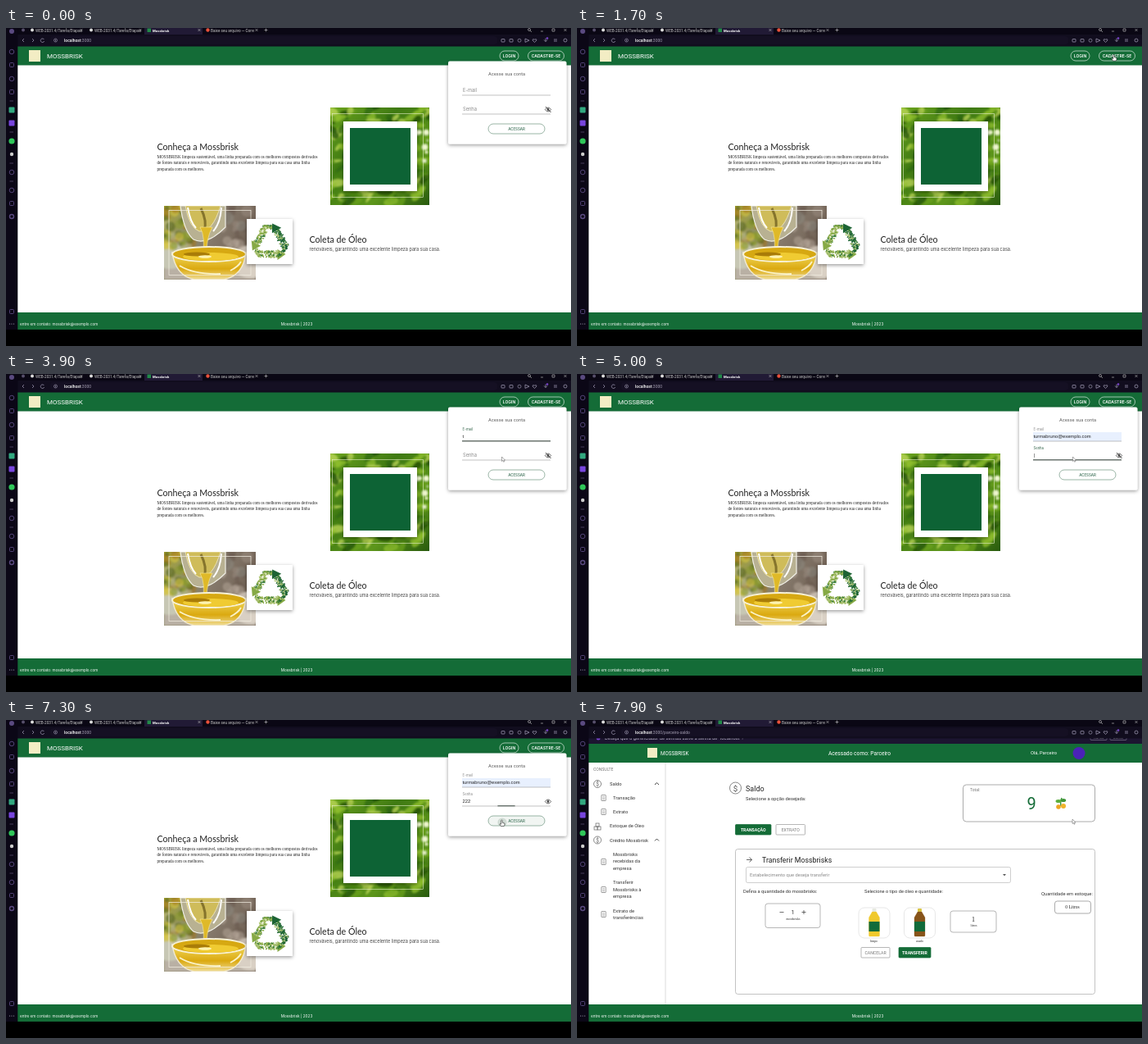
These frames come from a looping animation (690 by 388 pixels, 8 s). An HTML page:

```html
<!DOCTYPE html>
<html lang="pt">
<head>
<meta charset="utf-8">
<style>
html, body { margin: 0; width: 100%; height: 100%; overflow: hidden; background: #000; }
svg { display: block; width: 690px; height: 388px; }
text { white-space: pre; }
</style>
</head>
<body>
<svg id="stage" viewBox="0 0 690 388"></svg>
<script>
const GREEN = '#146c37', LOOP = 8000;
const SANS = 'Roboto,sans-serif', GEO = 'Inter,sans-serif', SERIF = "'Liberation Serif',serif";
const MAIL = 'turmabruno@exemplo.com';

// Shape helpers, each returning SVG markup
const rect = (x, y, w, h, fill, more = '') =>
  `<rect x="${x}" y="${y}" width="${w}" height="${h}" fill="${fill}" ${more}/>`;
const text = (x, y, size, s, fill = '#333', font = SANS, more = '') =>
  `<text x="${x}" y="${y}" font-size="${size}" fill="${fill}" font-family="${font}" ${more}>${s}</text>`;
const mid = (x, y, size, s, fill, font, more = '') =>
  text(x, y, size, s, fill, font, 'text-anchor="middle" ' + more);
const line = (d, color, w = 1, fill = 'none') =>
  `<path d="${d}" stroke="${color}" stroke-width="${w}" fill="${fill}"/>`;
const oval = (x, y, rx, ry, fill, more = '') =>
  `<ellipse cx="${x}" cy="${y}" rx="${rx}" ry="${ry}" fill="${fill}" ${more}/>`;
const dot = (x, y, r, fill, more) => oval(x, y, r, r, fill, more);
const ring = (x, y, r, color, w = .8) => dot(x, y, r, 'none', `stroke="${color}" stroke-width="${w}"`);
const frame = (x, y, w, h, color, r = 0, sw = .7, fill = 'none') =>
  rect(x, y, w, h, fill, `rx="${r}" stroke="${color}" stroke-width="${sw}"`);
const group = (id, s) => `<g id="${id}">${s}</g>`;
const BOLD = 'font-weight="600"';

let seed = 7;
const rnd = (a = 0, b = 1) => {
  seed = (seed * 16807) % 2147483647;
  return a + (b - a) * seed / 2147483647;
};
const pick = list => list[Math.floor(rnd(0, list.length))];

const defs = `<defs>
<linearGradient id="leaf" x2="1" y2="1"><stop stop-color="#6da51f"/><stop offset=".35" stop-color="#3f7a12"/><stop offset=".7" stop-color="#5d961b"/><stop offset="1" stop-color="#285a0d"/></linearGradient>
<linearGradient id="kitchen" x2="1" y2=".4"><stop stop-color="#a9a52f"/><stop offset=".3" stop-color="#8f9068"/><stop offset=".6" stop-color="#85796b"/><stop offset="1" stop-color="#6f5f53"/></linearGradient>
<linearGradient id="oil" x2="0" y2="1"><stop stop-color="#f2dc62"/><stop offset=".6" stop-color="#dba910"/><stop offset="1" stop-color="#f0dd97"/></linearGradient>
<filter id="shade" x="-20%" y="-20%" width="140%" height="150%"><feDropShadow dx="0" dy="1.5" stdDeviation="2" flood-opacity=".4"/></filter>
<filter id="soft"><feGaussianBlur stdDeviation="1"/></filter>
<clipPath id="cut1"><path d="M396 97h121v119h-121z"/></clipPath>
<clipPath id="cut2"><path d="M193 217h112v90h-112z"/></clipPath>
<clipPath id="pill"><rect x="589" y="117" width="69" height="12" rx="6"/></clipPath>
</defs>`;

function leaves() {
  let s = '';
  for (let i = 0; i < 150; i++) {
    const x = rnd(396, 517), y = rnd(97, 216);
    s += oval(x, y, rnd(4, 11), rnd(2, 5),
      pick(['#1f4d08', '#2f690d', '#4a8612', '#69a01c', '#8fbf2c', '#bfd858']),
      `opacity=".75" transform="rotate(${rnd(-80, 30)} ${x} ${y})"`);
  }
  for (let i = 0; i < 7; i++) s += dot(rnd(503, 515), rnd(125, 185), rnd(1, 4), '#eef6cf');
  return `<g clip-path="url(#cut1)">${rect(396, 97, 121, 119, 'url(#leaf)')}<g filter="url(#soft)">${s}</g></g>`
    + frame(398.5, 104.5, 111, 102, '#e5efc8', 0, .6)
    + rect(412, 114, 90, 85, '#fff', 'filter="url(#shade)"') + rect(420, 122, 74, 69, '#0d6335');
}

function oilPhoto() {
  let back = rect(193, 284, 112, 23, '#b9b0a4') + oval(298, 285, 22, 20, '#d9d0c4') + oval(200, 278, 20, 16, '#c7c7b4');
  for (let i = 0; i < 45; i++)
    back += dot(rnd(193, 228), rnd(217, 272), rnd(2, 6), pick(['#8b9a2b', '#d6c53f', '#55661f', '#b9b98c', '#a2741d']), 'opacity=".6"');
  for (let i = 0; i < 20; i++)
    back += dot(rnd(262, 305), rnd(217, 275), rnd(3, 8), pick(['#9c8e82', '#65564b', '#8d8b82', '#b5a799']), 'opacity=".5"');
  const jug = line('M213 217Q217 248 229 258Q245 266 268 243V217Z', '#f0efe6', 1.2, '#b8b192')
    + line('M219 217Q224 244 236 248Q252 250 262 217Z', '#f4ecc0', .8, '#cfbc5a')
    + line('M222 219Q225 237 232 244M263 219Q262 238 253 248', '#fff', 2)
    + line('M238 220Q246 236 242 247', '#85742c', 3);
  const stream = line('M237 243Q244 255 240 279H245Q244 257 252 243Z', '#f9eb9d', .6, '#dfb928');
  const bowl = line('M203 274Q207 302 230 307H266Q290 302 293 274Z', '#f2ead0', 1.5, 'url(#oil)')
    + oval(248, 276, 45, 9, '#d6a812', 'stroke="#f8f2d6" stroke-width="2"')
    + oval(250, 279, 34, 5, '#f0cb32') + oval(233, 276, 16, 2.5, '#a97c08')
    + oval(243, 279, 8, 1.7, '#fff3b0')
    + line('M212 290Q230 301 262 300M274 296Q284 291 287 285', '#fbf3c8', 1.8);
  return `<g clip-path="url(#cut2)">${rect(193, 217, 112, 90, 'url(#kitchen)')}<g filter="url(#soft)">${back}</g>${jug + stream + bowl}</g>`
    + frame(199, 222.5, 100, 79, '#f4f0e4', 0, .7);
}

// Three bent arrows filled with small leaves
function recycling() {
  let s = rect(294, 233, 56, 55, '#fff', 'filter="url(#shade)"');
  ['#86a945', '#86a945', '#1c6334'].forEach((color, k) => {
    let arm = line('M9 8L19 14L9 21Z', 'none', 0, color);
    for (let i = 0; i < 110; i++) {
      const along = rnd(-25, 10), across = rnd(10, 18), bend = Math.max(0, -14 - along);
      const x = along + bend * .5, y = across - bend * .87;
      arm += oval(x, y, 1.5, .8, pick([color, color, '#397c3a', '#b1c678']), `transform="rotate(${rnd(0, 180)} ${x} ${y})"`);
    }
    s += `<g transform="translate(322.5 262) rotate(${k * 120})">${arm}</g>`;
  });
  return s;
}

const button = (x, y, w, h, label, filled) =>
  frame(x, y, w, h, filled ? GREEN : '#999', 1, .7, filled ? GREEN : '#fff')
  + mid(x + w / 2, y + h / 2 + 2, 5.2, label, filled ? '#fff' : '#777', SANS, filled ? BOLD : '');
const pill = (x, w, label) => frame(x, 28, w, 12, '#dcebe1', 6) + mid(x + w / 2, 36, 5, label, '#fff', GEO, BOLD);

const home = rect(14, 22, 676, 326, '#fff')
  + rect(14, 45, 676, 1, '#8fb59d') + rect(14, 22, 676, 23, GREEN)
  + rect(28, 27, 14, 14, '#f3edc4')
  + text(50, 37, 8, 'MOSSBRISK', '#fff')
  + pill(603, 23, 'LOGIN') + pill(637.5, 44, 'CADASTRE-SE')
  + text(184.5, 149, 10.7, 'Conheça a Mossbrisk', '#222', 'Lato,sans-serif')
  + ['MOSSBRISK limpeza sustentável, uma linha preparada com os melhores compostos derivados',
    'de fontes naturais e renováveis, garantindo uma excelente limpeza para sua casa uma linha',
    'preparada com os melhores.'].map((s, i) => text(184.5, 158.7 + i * 7.6, 5.15, s, '#222', SERIF)).join('')
  + text(370.5, 262, 10.7, 'Coleta de Óleo', '#222', 'Lato,sans-serif')
  + text(370.5, 271.5, 5.53, 'renováveis, garantindo uma excelente limpeza para sua casa.', '#444', GEO)
  + leaves() + oilPhoto() + recycling();

const popup = rect(540, 40.5, 144.5, 101, '#fff', 'rx="2" filter="url(#shade)"')
  + mid(611.5, 57.5, 5.4, 'Acesse sua conta', '#555', GEO)
  + '<g id="fields"></g>';

const docIcon = (x, y) => frame(x - 2.7, y - 3.5, 5.4, 7, '#777', .5)
  + line(`M${x - 1.3} ${y - 1.3}h2.6m-2.6 1.6h2.6m-2.6 1.6h2.6`, '#777', .5);
const coin = (x, y, r) => ring(x, y, r, '#555', .7) + mid(x, y + r * .5, r * 1.4, '$', '#555');
const bottle = (x, color, cap) => frame(x, 229, 38, 37, '#ddd', 7, .7)
  + rect(x + 16.5, 230, 5, 4, cap, 'rx="1"')
  + line(`M${x + 16.5} 234h5l4 7v22q0 1-1 1h-11q-1 0-1-1v-22z`, color, .3, color)
  + rect(x + 12.5, 246, 13, 12, '#116b3a');

const account = rect(14, 22, 676, 340, '#fff')
  + rect(14, 22, 676, 7, '#1c1530')
  + text(34, 24, 5.8, 'Deseja que o gerenciador de senhas salve a senha de “localhost”?', '#d5d0e2')
  + dot(26, 22, 2.5, '#7b45d0')
  + frame(627, 18, 20, 6.5, '#777087', 1) + mid(637, 23, 4.5, 'Nunca', '#ddd')
  + frame(651, 18, 20, 6.5, '#777087', 1) + mid(661, 23, 4.5, 'Salvar', '#ddd')
  + rect(14, 29, 676, 23, GREEN)
  + rect(86, 34, 12, 12, '#f3edc4')
  + text(102, 43, 6.3, 'MOSSBRISK', '#fff')
  + mid(345, 43, 6.7, 'Acessado como: Parceiro', '#fff')
  + text(554, 42, 5.7, 'Olá, Parceiro', '#fff') + dot(613, 40.5, 7.5, '#4a22b8')
  + line('M108 52V360', '#ccc', .7)
  + text(20, 62, 5, 'CONSULTE', '#777')
  + [[40, 79.5, 'Saldo'], [44, 97, 'Transação'], [44, 114, 'Extrato'], [40, 131, 'Estoque de Óleo'], [40, 148.5, 'Crédito Mossbrisk'],
    [44, 165.5, 'Mossbrisks'], [44, 174, 'recebidas da'], [44, 182.5, 'empresa'], [44, 200, 'Transferir'], [44, 208.5, 'Mossbrisks à'],
    [44, 217, 'empresa'], [44, 234.5, 'Extrato de'], [44, 243, 'transferências']].map(([x, y, s]) => text(x, y, 5.8, s)).join('')
  + coin(25, 78, 4.5) + coin(25, 146.5, 4.5)
  + [95, 112, 173, 207, 237].map(y => docIcon(32.5, y)).join('')
  + frame(21, 130, 4, 4, '#666') + frame(25, 130, 4, 4, '#666') + frame(23, 126, 4, 4, '#666')
  + line('M95 79l2.5-2.5 2.5 2.5M95 147.5l2.5-2.5 2.5 2.5', '#333', .9)
  + coin(193.5, 83, 7)
  + text(206, 86.5, 9, 'Saldo', '#222') + text(206, 98, 5.8, 'Selecione a opção desejada:')
  + frame(471.5, 79, 161, 45, '#888', 4)
  + text(480, 87, 5, 'Total:', '#777') + mid(555, 109, 20, '9', GREEN)
  + line('M591 105Q590 99 592 95', '#3c963e', 1.5)
  + oval(588, 99, 3.5, 2, '#5aae3e') + oval(594, 98, 3.2, 2, '#3f9638')
  + dot(588, 106, 2.8, '#eda522') + dot(594, 105, 3, '#f0b52c')
  + button(193.5, 127.5, 43.5, 12.5, 'TRANSAÇÃO', 1) + button(243, 127.5, 35.5, 12.5, 'EXTRATO')
  + frame(193.5, 157.5, 439, 177, '#aaa', 3)
  + line('M207 170.5h6.5m-3-3 3 3-3 3', '#444', .8)
  + text(226, 173.5, 8.8, 'Transferir Mossbrisks', '#222')
  + frame(206.5, 179.5, 323, 19, '#bbb', 2)
  + text(211, 191, 5.8, 'Estabelecimento que deseja transferir', '#888')
  + '<path d="M520 188h4l-2 2.3z" fill="#555"/>'
  + text(203, 211, 5.7, 'Defina a quantidade do mossbrisks:')
  + text(351, 211, 5.7, 'Selecione o tipo de óleo e quantidade:')
  + text(567, 214, 5.8, 'Quantidade em estoque:')
  + frame(583.5, 221, 44, 15, '#888', 3) + mid(605, 230.3, 5.6, '0 Litros', '#222', SERIF)
  + frame(230, 224, 67, 29.5, '#999', 3)
  + line('M247.5 234.5h5m22 0h5m-2.5-2.5v5', '#333', .7)
  + mid(263.5, 237, 7.5, '1') + mid(264, 244, 3.8, 'mossbrisks', '#222', SERIF)
  + bottle(344, '#f0c92c', '#e6e9e0') + bottle(399.5, '#87541a', '#d9c545')
  + mid(362.5, 270.5, 3.8, 'limpo', '#222', SERIF) + mid(418.5, 270.5, 3.8, 'usado', '#222', SERIF)
  + frame(456, 233, 56, 26, '#999', 3)
  + mid(484, 245.5, 8, '1', '#222', SERIF) + mid(484.5, 252, 3.8, 'litros', '#222', SERIF)
  + button(347, 277.5, 35, 12.5, 'CANCELAR') + button(393, 277.5, 39, 12.5, 'TRANSFERIR', 1);

const footer = rect(14, 347, 676, 21, GREEN)
  + text(17, 363, 4.6, 'entre em contato: mossbrisk@exemplo.com', '#fff', GEO)
  + mid(355, 363, 4.7, 'Mossbrisk | 2023', '#fff', GEO)
  + rect(0, 368, 690, 20, '#000');

const cross = x => line(`M${x - 1.5} 1l3 3m0-3l-3 3`, '#bbb', .6);
const GREY = '#aaa4bd', LILAC = '#5a4a80';
const chrome = rect(0, 0, 690, 22.5, '#110d1e') + rect(0, 0, 690, 8, '#0a0714')
  + rect(0, 0, 14.3, 368, '#0b0716') + rect(169, 0, 71, 8, '#211a35')
  + dot(21, 2.5, 2, '#57506c')
  + [[30, 'WEB-2031.4/Tarefa/Etapas'], [102, 'WEB-2031.4/Tarefa/Etapas']].map(([x, s]) =>
    dot(x + 2, 2.5, 2, '#ddd') + text(x + 6, 4.5, 4.7, s, '#ccc')).join('')
  + rect(172.5, .5, 4.5, 4.5, '#218a48') + text(179, 4.5, 4.3, 'Mossbrisk', '#fff', SANS, BOLD)
  + dot(246.5, 2.5, 2.2, '#e8503a') + text(250, 4.5, 4.7, 'Baixe seu arquivo — Conv', '#ccc')
  + [92, 164, 236, 306, 683].map(cross).join('')
  + line('M315.5 2.5h4m-2-2v4M653 4h3M667 1h3v3h-3z', '#ccc', .6)
  + ring(639, 2, 1.5, '#ccc', .6) + line('M640 3l2 2', '#ccc', .6)
  + line('M22 13l-2 2 2 2M32 13l2 2-2 2M46.5 14a2.3 2.3 0 1 0 .2 2', GREY, .7)
  + rect(54, 10, 546, 10, '#151023', 'rx="4"')
  + ring(60.5, 15, 2, GREY, .6) + line('M60.5 14v2.2', GREY, .6)
  + text(71, 17, 5, '<tspan font-weight="500">localhost</tspan><tspan fill="#a7a1b5" id="path"></tspan>', '#fff')
  + [607, 617].map(x => frame(x - 2, 13.5, 4, 3.5, GREY, .5)).join('')
  + ring(627, 15.2, 2, GREY, .6) + line('M634 13l5 2.2-5 2.2zM645.5 17.5l-2.5-2.5q0-2.3 2.5-.9q2.5-1.4 2.5.9z', GREY, .7)
  + line('M659 12.5v4m-2-2 2 2 2-2m8-.5h4m-4 2h4', GREY, .7) + dot(661, 12.5, 1.3, '#7b45d0')
  + ring(683, 15, 2, GREY, .7)
  + dot(7, 4, 3, LILAC)
  + [29, 62, 176, 198].map(y => ring(7, y, 2.8, LILAC, .9)).join('')
  + [45, 78, 214, 346].map(y => frame(4.5, y - 2.5, 5, 5, LILAC, 1, .9)).join('')
  + line('M4.5 89h4.5M4.5 127h4.5M4.5 165h4.5M4.5 187h4.5', '#554b6c', .8)
  + rect(3.5, 96.5, 7, 7, '#32a980', 'rx="1"') + rect(3.5, 112.5, 7, 7, '#7845de', 'rx="1"')
  + dot(7, 138, 3.6, '#30c75a') + dot(7, 154, 2.2, '#ccc')
  + ring(7, 230, 2.5, LILAC, 1.4)
  + [4.5, 7, 9.5].map(x => dot(x, 361, .6, GREY)).join('');

stage.innerHTML = defs + group('homePage', home) + group('loginBox', popup)
  + group('accountPage', account) + footer + chrome + group('mouse', '');
const $ = id => document.getElementById(id);

const clamp = v => Math.max(0, Math.min(1, v));
const ramp = (t, start, length) => clamp((t - start) / length);
const ease = v => v * v * (3 - 2 * v);
const show = (el, opacity) => el.setAttribute('opacity', opacity);

const pointers = {
  arrow: line('M0 0V5.5L1.3 4.4 2.2 6.3 3.1 5.9 2.3 4.1H4Z', '#555', .5, '#fff'),
  hand: line('M-.8 .5Q0-.5 .8 .5V3.2L3.5 4V6L2.8 7.5H-1L-2.7 5Q-2.3 4-.8 5.2Z', '#222', .6, '#fff'),
  beam: line('M-1.3-3.5Q0-3.5 0-2.8Q0-3.5 1.3-3.5M0-2.8V2.8M-1.3 3.5Q0 3.5 0 2.8Q0 3.5 1.3 3.5', '#333', .7)
};
const route = [[300, 640, 65, 'arrow'], [700, 622, 34, 'hand'], [1000, 622, 34, 'hand'], [1400, 655.5, 32.5, 'hand'],
  [1900, 655.5, 32.5, 'hand'], [2150, 616, 34, 'hand'], [2350, 616, 34, 'hand'], [2600, 616, 59, 'beam'],
  [2900, 606, 76, 'beam'], [3300, 606, 76, 'beam'], [3600, 605.5, 101, 'arrow'], [5300, 605.5, 101, 'arrow'],
  [5700, 660, 103, 'hand'], [6600, 660, 103, 'hand'], [7000, 606, 123.5, 'hand'], [7550, 605, 121, 'arrow'], [8000, 605, 121, 'arrow']];

function pointer(t) {
  const i = route.findIndex(p => p[0] > t);
  if (i < 1) return '';
  const [t0, x0, y0, kind] = route[i - 1], [t1, x1, y1] = route[i];
  const k = ease((t - t0) / (t1 - t0));
  return `<g transform="translate(${x0 + (x1 - x0) * k} ${y0 + (y1 - y0) * k})">${pointers[kind]}</g>`;
}

function field(t, y, label, value, on, off) {
  const up = ease(ramp(t, on, 150)), focus = ramp(t, on, 250) * (1 - ramp(t, off, 250));
  const active = t >= on && t < off;
  const caret = active && (t - on) % 1000 < 500 ? '<tspan fill="#222">|</tspan>' : '';
  return text(558 - up * .5, y - 4 - up * 9, 5.7 - up * 1.5, label, active ? '#2f6146' : '#888', GEO)
    + text(557.5, y - 3.6, 5.8, value + caret, '#222', "'Liberation Sans',sans-serif")
    + rect(557, y - .3, 108, .6, '#9a9a9a')
    + rect(611 - 54 * focus, y - .7, 108 * focus, 1, '#3f4d45');
}

function eye(open) {
  return line('M658.3 99.5Q662 94.5 665.7 99.5Q662 104.5 658.3 99.5Z', '#555', .9) + dot(662, 99.5, 1.4, '#444')
    + (open ? '' : line('M659 96l6.5 7', '#444', 1));
}

function form(t) {
  const filled = t >= 4350, open = t >= 6050;
  const mail = filled ? MAIL : t >= 4100 ? 'tu' : t >= 3800 ? 't' : '';
  const count = clamp(Math.floor((t - 4900) / 180) / 3) * 3;
  const press = ramp(t, 7150, 300), hover = t > 6950;
  return (filled ? rect(557, 71, 108, 11, '#e8f0fe') : '')
    + field(t, 82, 'E-mail', mail, 3000, 4700)
    + field(t, 105, 'Senha', (open ? '2' : '•').repeat(count), 4700, 7100)
    + (t > 5650 && t < 6700 ? dot(662, 99.5, 5.5, '#ddd') : '') + eye(open)
    + frame(589, 117, 69, 12, '#6f9580', 6, .7, hover ? '#f1f5f2' : '#fff')
    + (press ? `<g clip-path="url(#pill)">${dot(606, 125, press * 11, '#9db5a6', 'opacity=".4"')}</g>` : '')
    + mid(623.5, 124.7, 4.4, 'ACESSAR', '#4f7f68', GEO, BOLD);
}

function draw(t) {
  const signedIn = t >= 7600;
  show($('homePage'), signedIn ? 0 : 1);
  show($('accountPage'), signedIn ? 1 : 0);
  show($('loginBox'), signedIn ? 0 : t < 1500 ? 1 - ramp(t, 700, 180) : ramp(t, 2300, 180));
  $('fields').innerHTML = form(t);
  $('path').textContent = signedIn ? ':3000/parceiro-saldo' : ':3000';
  $('accountPage').setAttribute('transform', `translate(0 ${6 * ramp(t, 7800, 100) - 6})`);
  $('mouse').innerHTML = pointer(t);
}

const start = performance.now();
function tick() {
  draw((performance.now() - start) % LOOP);
  requestAnimationFrame(tick);
}
tick();
</script>
</body>
</html>
```
